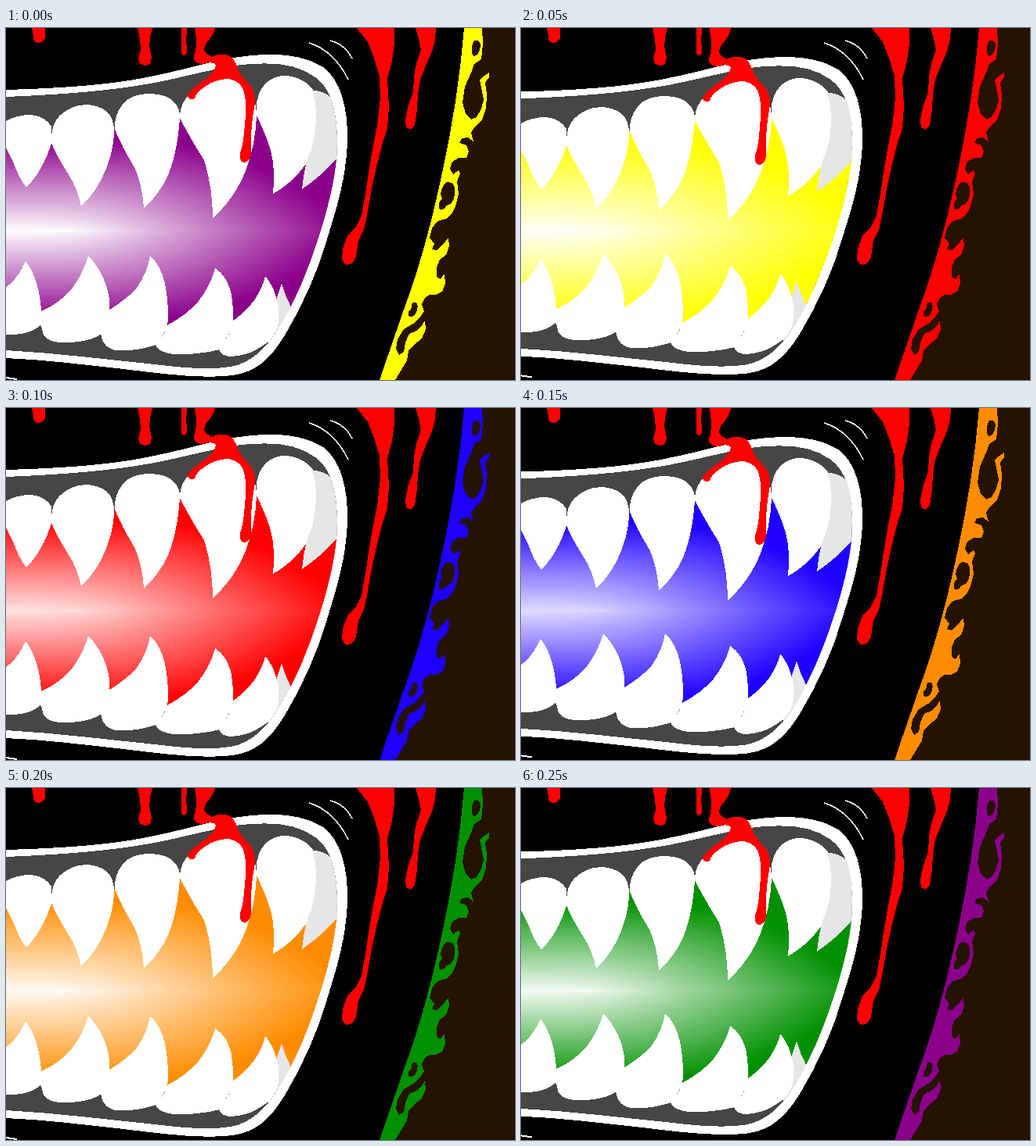
These frames come from a looping animation (650x450 px, 0.3 s). An HTML page:

```html
<!DOCTYPE html>
<html lang="en">
<head>
<meta charset="utf-8">
<title>Neon fangs</title>
<style>
html, body { margin: 0; height: 100%; overflow: hidden; background: #000; }
svg { display: block; width: 650px; height: 450px; shape-rendering: crispEdges; }
.blood { fill: red; }
.line { fill: none; stroke: #fff; }
</style>
</head>
<body>
<svg viewBox="0 0 650 450">
  <defs>
    <clipPath id="inside">
      <path id="mouth" d="M0 88C70 85 130 81 190 70C235 61 255 54 300 47C345 43 371 46 395 63C414 77 422 102 423 140C424 185 411 231 398 270C385 311 371 346 350 380C334 408 314 428 287 433C255 438 215 433 190 430C130 424 70 416 0 412Z"/>
    </clipPath>
    <clipPath id="gap">
      <path d="M0 150L58 145L139 130L222 114L320 111L394 148L430 155V352L365 358L345 348L289 376L204 381L131 363L45 364L0 340Z"/>
    </clipPath>
  </defs>

  <!-- flaming outer edge -->
  <rect width="650" height="450" fill="#261200"/>
  <path d="M0 0H585Q577 95 557 185Q536 285 508 360L477 450H0Z"/>
  <path id="flame" d="M585 0H608L609 20 607 40 598 46 594 57 586 75 583 95 587 110 594 117 601 114 607 103 610 92 607 76 605 66 611 61 617 57V63L612 70 614 85 613 103 608 118 598 127 594 134 597 145 590 140 582 141 579 147 588 150 591 158 588 166 578 166 570 171 567 180 571 187 578 182 580 186 576 196 578 212 574 228 569 238 562 244 551 247 544 256 541 268 547 276 544 283 550 284 558 277 565 268 566 279 562 290 554 296 550 306V318L555 321 560 314 561 327 557 337 549 341H541L535 345 531 353 534 362 528 371 520 378 508 385 500 398 498 410 502 418 508 414 510 402 515 391 524 387 530 382 535 374 536 385 531 397 521 405 514 413 512 425 505 437 497 450H477L508 360Q536 285 557 185Q577 95 585 0Z"/>
  <g fill="#261200">
    <path d="M597 17Q604 13 606 22Q605 34 598 36Q592 32 597 17Z"/>
    <path d="M562 197Q574 196 573 209Q573 225 562 227Q559 234 553 231Q552 222 557 218Q552 209 562 197Z"/>
    <path d="M519 351Q528 350 525 360Q523 370 515 369Q511 362 517 360Z"/>
  </g>

  <!-- still drips and creases -->
  <g class="blood">
    <path d="M33 0H50V13Q47 19 41 19Q34 18 35 10Z"/>
    <path d="M168 0H187L184 12 183 24 186 38 184 46 178 48 171 46 169 39 172 27 171 14Z"/>
    <path d="M224 0H231L230 18Q233 30 229 35Q223 36 224 27Z"/>
    <path d="M448 0L462 18 470 38 477 62 478 90 474 125 468 155 463 185 460 205 454 240 447 254 436 266 430 282 429 296 434 303 442 301 447 293 450 272 457 258 461 240 467 205 473 178 480 150 487 128 489 100 487 65 493 42 496 20V0Z"/>
    <path d="M523 0L527 14 530 28 524 45 521 62 520 82 514 98 510 118 511 127 517 130 522 124 525 104 526 85 529 66 537 46 544 30 548 15 549 0Z"/>
  </g>
  <path class="line" stroke-width="1.6" d="M387 19Q419 29 437 66M414 16Q433 21 442 39"/>

  <!-- lips, gums and glow -->
  <g id="jaws">
    <path fill="#fff" d="M0 79C70 77 130 73 180 63C230 53 255 44 290 38C340 30 378 33 405 50C430 69 437 108 436 148C433 201 420 236 410 270C398 312 380 352 356 393C337 424 318 440 290 444C250 449 200 442 150 436C95 430 50 424 0 422Z"/>
    <use href="#mouth" fill="#464646"/>
    <g clip-path="url(#inside)"><g id="glow" clip-path="url(#gap)"></g></g>
    <path class="line" stroke-width="2" d="M0 447L14 449"/>
  </g>

  <g clip-path="url(#inside)">
    <g id="upper" fill="#fff">
      <path d="M0 119Q14 111 32 111Q50 113 58 126V147Q48 181 26 204Q16 191 9 171L0 153Z"/>
      <path d="M58 147Q57 122 70 111Q82 99 102 98Q124 99 133 112Q139 122 138 137Q136 165 122 193Q111 214 96 228Q91 204 79 186Q65 164 58 147Z"/>
      <path d="M139 130Q138 108 153 93Q165 84 184 84Q206 85 214 94Q223 103 222 115Q219 159 207 188Q196 213 176 230Q174 200 164 178Q149 154 139 130Z"/>
      <path d="M222 115Q222 96 236 83Q253 64 278 63Q301 66 311 79Q320 93 320 113Q318 151 307 180Q293 217 264 243Q264 205 253 169Q234 139 222 115Z"/>
      <path d="M320 112Q318 92 326 78Q337 61 356 61Q379 62 392 79L402 100V150L383 174Q366 198 341 212Q344 180 338 156Q331 134 320 112Z"/>
      <path fill="#e6e6e6" d="M391 80Q412 80 419 96L426 110V163Q402 190 378 206Q381 173 391 152Q401 110 391 80Z"/>
    </g>
    <g id="lower" fill="#fff">
      <path d="M0 331Q14 322 25 298Q37 314 42 338Q47 365 44 380Q30 393 0 392Z"/>
      <path d="M45 362Q70 351 85 332Q99 313 105 291Q120 307 127 326Q135 350 131 365L123 390Q108 402 76 402Q47 403 46 384L43 377Z"/>
      <path d="M131 361Q154 347 167 332Q180 314 184 291Q198 304 203 327Q209 358 206 383L192 405Q164 414 140 412Q120 408 121 384Z"/>
      <path d="M204 381Q231 367 246 349Q262 328 267 307Q283 318 288 341Q291 361 290 382L273 411Q246 418 215 417Q191 415 189 399Q203 397 204 381Z"/>
      <path fill="#e6e6e6" d="M352 327Q357 343 364 357Q353 387 336 403L327 400L346 345Z"/>
      <path d="M289 375Q306 363 317 348Q328 332 331 317Q343 331 348 356Q350 376 345 387Q339 400 325 408Q309 419 287 420Q271 419 271 405Q286 399 289 375Z"/>
    </g>
  </g>

  <path id="bite" class="blood" d="M240 -4H269Q264 11 256 19Q251 27 255 32L263 37Q273 31 287 36Q295 45 297 55Q303 64 314 76Q320 89 317 102Q312 129 313 157Q313 171 304 172Q297 170 299 160Q304 146 305 122Q308 99 304 82Q300 68 284 65Q266 65 250 78Q243 83 241 90Q233 94 232 85Q241 74 254 66Q267 56 268 47Q263 42 252 46Q239 46 240 36Q246 20 240 -4Z"/>
</svg>
<script>
const STEP = 50, LAYERS = 60;
const HUES = [[255, 255, 0], [255, 0, 0], [30, 0, 255], [255, 140, 0], [0, 144, 0], [139, 0, 139]];
const CORE = [.97, .87, .85, .94, .95, .98];   // whiteness at the heart of each hue
const el = id => document.getElementById(id);
const shift = (id, y) => el(id).setAttribute('transform', `translate(0 ${y})`);
const tint = (hue, white) => `rgb(${hue.map(v => Math.round(v + (255 - v) * white))})`;

// The glow is a stack of pointed lenses, shrinking to a line at the left
function lens(t) {
  const h = 115 * t, flat = 140 * t, bend = 60 + 270 * t, tip = 90 + 350 * t;
  return `M-1 ${259 - h}H${flat}Q${bend} ${259 - h} ${tip} 259Q${bend} ${259 + h} ${flat} ${259 + h}H-1Z`;
}

el('glow').innerHTML = '<rect width="650" height="450"/>' +
  Array.from({ length: LAYERS }, (_, k) => `<path d="${lens(1 - k / LAYERS)}"/>`).join('');
const layers = [...el('glow').children];
let last = -1;

function draw(time) {
  const i = Math.floor(Math.max(0, time) / STEP) % HUES.length;
  if (i !== last) {
    last = i;
    // the mouth glows in the hue the flame has just left
    const j = (i + HUES.length - 1) % HUES.length, shut = i % 2;
    el('flame').setAttribute('fill', tint(HUES[i], 0));
    layers.forEach((p, k) => p.setAttribute('fill', tint(HUES[j], CORE[j] * k / LAYERS)));
    el('jaws').setAttribute('transform', shut ? 'translate(0 3.6) scale(1 .986)' : '');
    shift('upper', 3 * shut);
    shift('lower', -3 * shut);
    shift('bite', 3 * shut);
  }
  requestAnimationFrame(t => draw(t - start));
}

const start = performance.now();
draw(0);
</script>
</body>
</html>
```
